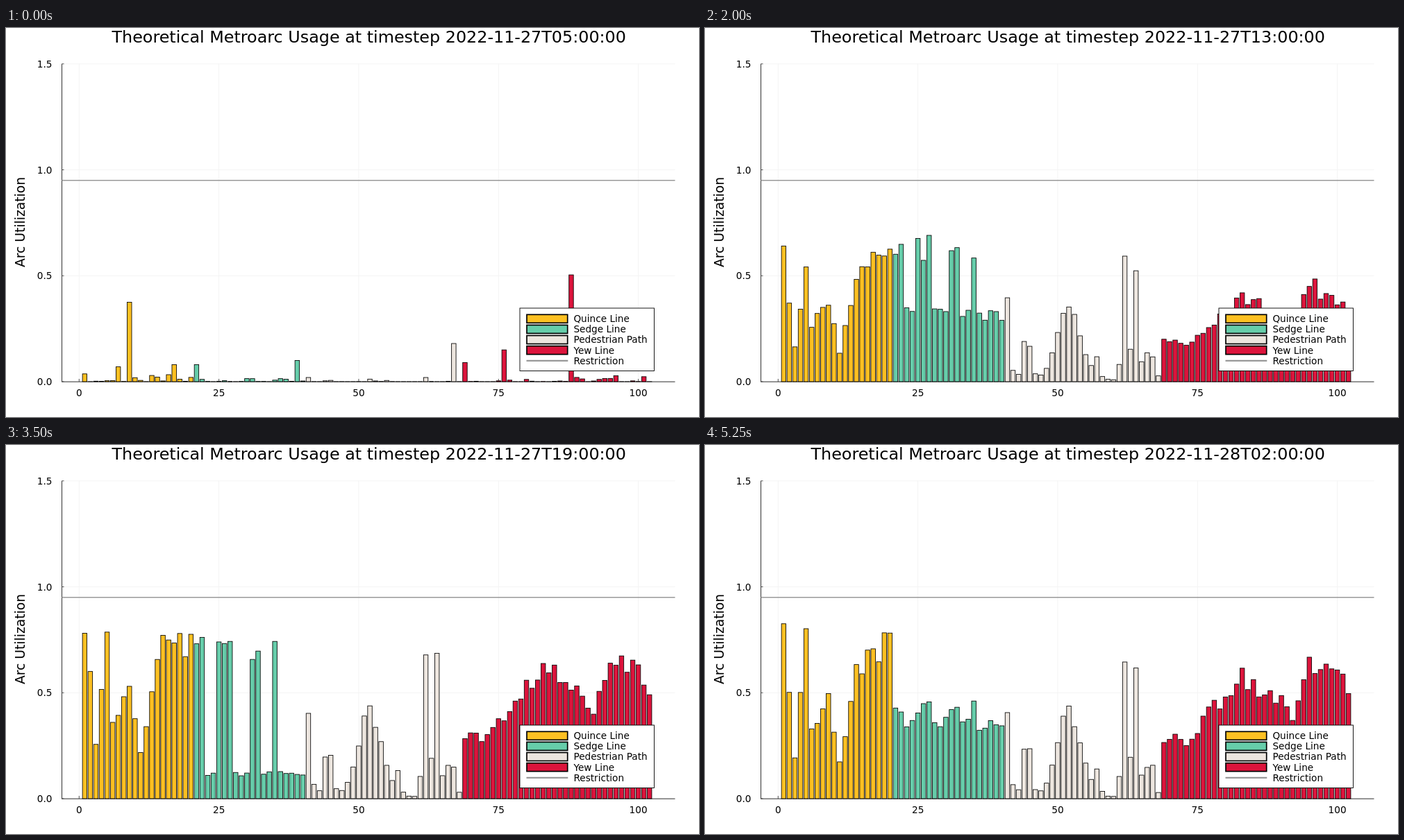
Write an HTML page with a canvas that moves like this. It is 998 px wide and 561 px high and loops after 5500 ms.

```html
<!DOCTYPE html>
<html lang="en">
<head>
<meta charset="utf-8">
<title>Arc utilization</title>
<style>
  html, body { margin: 0; width: 100%; height: 100%; overflow: hidden; background: #fff; }
  canvas { display: block; }
</style>
</head>
<body>
<canvas id="chart" width="998" height="561"></canvas>
<script>
const ctx = document.getElementById('chart').getContext('2d');
const STEP = 250, STEPS = 22, START = 5;
const LEFT = 80.5, RIGHT = 963.5, TOP = 51.7, BASE = 510;
const FONT = '"DejaVu Sans", Verdana, sans-serif';
const UNIT = 1.704;
const px = v => 105.3 + v * 8.053;
const py = v => BASE - v * 305.5;

const clamp = (v, lo = 0, hi = 1) => Math.min(hi, Math.max(lo, v));
const wave = (step, period) => Math.cos((step - 6) * 2 * Math.PI / period);
const bell = (x, mid, width) => Math.exp(-(((x - mid) / width) ** 2));

function rand(arc, step) {
  const s = Math.sin(arc * 12.9898 + step * 78.233) * 43758.5453;
  return s - Math.floor(s);
}

// Straight lines through a few [arc, level] points.
function along(points, x) {
  const i = clamp(points.findIndex(p => p[0] >= x), 1, points.length - 1);
  const [x0, y0] = points[i - 1], [x1, y1] = points[i];
  return y0 + (y1 - y0) * (x - x0) / (x1 - x0);
}

const goldShape = [[1, .78], [3, .22], [5, .79], [6, .32], [9, .5], [11, .18], [14, .65], [20, .76]];
const redShape = [[69, .26], [73, .24], [83, .53], [92, .36], [95, .6], [102, .46]];
const hills = [[41, .39, .7], [44.5, .24, 1], [52, .36, 3], [57, .1, .7],
               [62, .6, .7], [64, .58, .7], [66.5, .17, 1]];
const goldBranch = [1, 4, 5, 19, 20];
const greenTrunk = [21, 22, 25, 26, 27, 31, 32, 35];
const closedAt = 17;

// Each line: its arcs, the usual level of an arc, and how the load moves through the day.
const lines = [
  {
    name: 'Quince Line', color: '#fdc022', first: 1, last: 20,
    level: arc => along(goldShape, arc),
    load(arc, step) {
      if (!goldBranch.includes(arc)) return .95 - .2 * wave(step, 20);
      return step === closedAt ? 0 : .5 + .5 * clamp((step - 6) / 4);
    }
  },
  {
    name: 'Sedge Line', color: '#66cdaa', first: 21, last: 40,
    level: arc => greenTrunk.includes(arc) ? .62 : .25,
    load: (arc, step) => greenTrunk.includes(arc)
      ? .7 + .7 * bell(step, 11.5, 4)
      : .95 + .48 * wave(step, 15.5)
  },
  {
    name: 'Pedestrian Path', color: '#ede6df', first: 41, last: 68,
    level: arc => hills.reduce((sum, [mid, height, width]) => sum + height * bell(arc, mid, width), .01),
    load: (arc, step) => .7 + .4 * clamp((step - 6) / 4)
  },
  {
    name: 'Yew Line', color: '#dc143c', first: 69, last: 102,
    level: arc => along(redShape, arc),
    load: (arc, step) => 1 - .28 * wave(step, 22)
  }
];

// Early-morning peaks: arc, height, share kept per step.
const peaks = [[7, .07, .5], [9, .375, .53], [17, .08, .6], [21, .08, .45], [39, .1, .8],
               [67, .18, .1], [69, .09, .1], [76, .15, .37], [88, .504, .86]];

function usage(line, arc, step) {
  const level = line.level(arc), awake = clamp((step - 2) / 4);
  const day = level * line.load(arc, step) * (.9 + .2 * rand(arc, step));
  const trickle = level * .06 * rand(arc, step) ** 3;
  const peak = peaks.find(p => p[0] === arc);
  const early = peak && step < 6 ? peak[1] * peak[2] ** step : 0;
  return clamp(Math.max(trickle + (day - trickle) * awake, early), 0, .94);
}

function stroke(x1, y1, x2, y2, color, width) {
  ctx.strokeStyle = color;
  ctx.lineWidth = width;
  ctx.beginPath();
  ctx.moveTo(x1, y1);
  ctx.lineTo(x2, y2);
  ctx.stroke();
}

function box(x, y, w, h, fill, width) {
  ctx.fillStyle = fill;
  ctx.fillRect(x, y, w, h);
  ctx.strokeStyle = '#000';
  ctx.lineWidth = width;
  ctx.strokeRect(x, y, w, h);
}

function text(str, x, y, size, align) {
  ctx.font = `${size * UNIT}px ${FONT}`;
  ctx.textAlign = align;
  ctx.fillStyle = '#000';
  ctx.fillText(str, x, y);
}

function drawGrid() {
  const xs = [0, 25, 50, 75, 100], ys = [0, .5, 1, 1.5];
  xs.forEach(v => stroke(px(v), TOP, px(v), BASE, '#f4f4f4', 1));
  ys.forEach(v => stroke(LEFT, py(v), RIGHT, py(v), '#f4f4f4', 1));
  stroke(LEFT, TOP, LEFT, BASE + .5, '#333', 1);
  stroke(LEFT, BASE + .2, RIGHT, BASE + .2, '#333', 1);
  xs.forEach(v => {
    stroke(px(v), BASE, px(v), BASE - 4, '#444', .9);
    text(String(v), px(v), 531, 8, 'center');
  });
  ys.forEach(v => {
    stroke(LEFT, py(v), LEFT + 3, py(v), '#444', .9);
    text(v.toFixed(1), 66.5, py(v) + 5, 8, 'right');
  });
}

function drawTitles(step) {
  const hour = START + step, pad = n => String(n).padStart(2, '0');
  const stamp = `2022-11-${27 + Math.floor(hour / 24)}T${pad(hour % 24)}:00:00`;
  text(`Theoretical Metroarc Usage at timestep ${stamp}`, 522.7, 21, 14, 'center');
  ctx.save();
  ctx.translate(27, 280);
  ctx.rotate(-Math.PI / 2);
  text('Arc Utilization', 0, 0, 11, 'center');
  ctx.restore();
}

function drawBars(step) {
  for (const line of lines) {
    for (let arc = line.first; arc <= line.last; arc++) {
      const top = py(usage(line, arc, step));
      box(px(arc - .4), top, 6.44, BASE - top, line.color, .85);
    }
  }
}

function drawLegend() {
  box(740, 404, 193.5, 90.5, '#fff', .9);
  const row = i => 419.3 + i * 15.12;
  lines.forEach(({ name, color }, i) => {
    box(750, row(i) - 6, 58.7, 12, color, 1.7);
    text(name, 817.4, row(i) + 4.9, 8, 'left');
  });
  stroke(749.5, row(4), 809.3, row(4), '#999', 2.2);
  text('Restriction', 817.4, row(4) + 4.9, 8, 'left');
}

function draw(step) {
  ctx.fillStyle = '#fff';
  ctx.fillRect(0, 0, 998, 561);
  drawGrid();
  drawTitles(step);
  drawBars(step);
  stroke(LEFT, py(.95), RIGHT, py(.95), '#999', 1.6);
  drawLegend();
}

let start, shown = 0;
function tick(now) {
  start ??= now;
  const step = Math.floor((now - start) / STEP) % STEPS;
  if (step !== shown) draw(shown = step);
  requestAnimationFrame(tick);
}
draw(shown);
requestAnimationFrame(tick);
</script>
</body>
</html>
```
